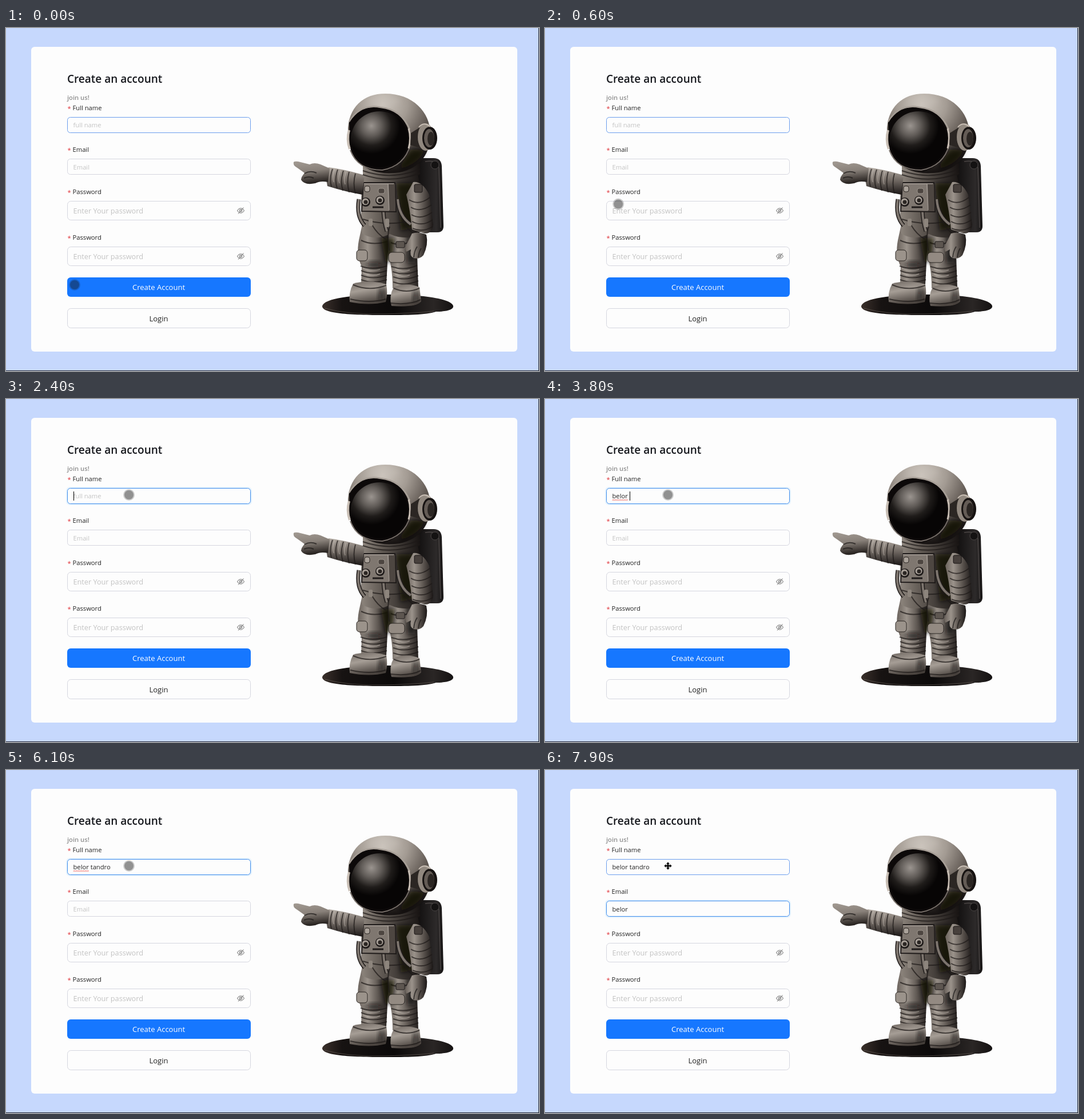
Animation of 932 by 601 pixels, one loop 8000 ms. Source, as an HTML page:

```html
<!DOCTYPE html>
<html lang="en">
<head>
<meta charset="utf-8">
<title>Create an account</title>
<style>
  html, body { margin: 0; width: 100%; height: 100%; overflow: hidden; background: #c6d8fd; }
  svg { display: block; width: 932px; height: 601px; }
  text { font: 11.2px "Open Sans", "Noto Sans", sans-serif; fill: #222; }
  .title { font-size: 19px; font-weight: 600; fill: #15171c; }
  .sub { font-weight: 600; fill: #8e8e8e; }
  .star { fill: #e0353c; }
  .hint { fill: #c3c3c3; }
  .big { font-size: 12.7px; }
  .mid { font-size: 13px; text-anchor: middle; }
  .box { fill: #fdfdfd; stroke: #d5d6df; }
  .hover { stroke: #6a9ded; }
  .focus { stroke: #3f8cec; }
  .glow { fill: none; stroke: #0591ff; stroke-opacity: .1; stroke-width: 2; }
  .fold { fill: none; stroke: #1d1918; stroke-opacity: .7; stroke-width: 2; }
  .shine { fill: none; stroke: #c9c1b9; stroke-opacity: .5; stroke-width: 1.5; }
  .shade { fill: #0d0a09; fill-opacity: .75; filter: url(#soft); }
  .light { fill: #c4bcb4; fill-opacity: .55; filter: url(#soft); }
</style>
</head>
<body>
<svg viewBox="0 0 932 601">
  <defs>
    <filter id="soft" x="-50%" y="-50%" width="200%" height="200%"><feGaussianBlur stdDeviation="4"/></filter>
    <pattern id="wave" width="4" height="3" patternUnits="userSpaceOnUse" x="117.5" y="175.5">
      <path d="M0 2.5L2 .5L4 2.5" fill="none" stroke="#e8322c"/>
    </pattern>
    <radialGradient id="shell" cx=".42" cy=".12" r=".88">
      <stop offset="0" stop-color="#cfc8c0"/><stop offset=".35" stop-color="#a39b93"/>
      <stop offset=".62" stop-color="#69615b"/><stop offset=".85" stop-color="#2e2926"/>
      <stop offset="1" stop-color="#171312"/>
    </radialGradient>
    <radialGradient id="glass" cx=".36" cy=".26" r=".5">
      <stop offset="0" stop-color="#9a948f"/><stop offset=".35" stop-color="#625d59"/>
      <stop offset=".7" stop-color="#1f1c1a"/><stop offset="1" stop-color="#070505"/>
    </radialGradient>
    <linearGradient id="suit">
      <stop offset="0" stop-color="#8d857d"/><stop offset=".35" stop-color="#5f5852"/>
      <stop offset=".75" stop-color="#322d2a"/><stop offset="1" stop-color="#171312"/>
    </linearGradient>
    <linearGradient id="limb">
      <stop offset="0" stop-color="#6b635d"/><stop offset=".3" stop-color="#9b938b"/>
      <stop offset=".65" stop-color="#59524d"/><stop offset="1" stop-color="#1b1716"/>
    </linearGradient>
    <linearGradient id="arm" x2="0" y2="1">
      <stop offset="0" stop-color="#b4aca4"/><stop offset=".45" stop-color="#756d67"/>
      <stop offset="1" stop-color="#1b1716"/>
    </linearGradient>
    <linearGradient id="hand" x2=".2" y2="1">
      <stop offset="0" stop-color="#a39b93"/><stop offset=".5" stop-color="#89817a"/>
      <stop offset="1" stop-color="#2b2623"/>
    </linearGradient>
    <linearGradient id="boot" x2=".3" y2="1">
      <stop offset="0" stop-color="#6f6761"/><stop offset=".45" stop-color="#a69e96"/>
      <stop offset="1" stop-color="#4d4641"/>
    </linearGradient>
    <linearGradient id="pack">
      <stop offset="0" stop-color="#0d0b0b"/><stop offset=".75" stop-color="#2d2a2a"/>
      <stop offset="1" stop-color="#151313"/>
    </linearGradient>
    <linearGradient id="disc">
      <stop offset="0" stop-color="#3a302b"/><stop offset=".15" stop-color="#171312"/>
      <stop offset=".55" stop-color="#0c0a0a"/><stop offset=".85" stop-color="#2a2625"/>
      <stop offset="1" stop-color="#151212"/>
    </linearGradient>
    <g id="eye" fill="none" stroke="#858585" stroke-width="1.1">
      <path d="M-6 0Q0-8.500 6 0Q0 8.500-6 0Z"/><circle r="2.100"/><path d="M-4.500 5.500L5-5.500"/>
    </g>
    <g id="knob">
      <circle r="8" fill="#1f1b1a"/><circle cx="-.5" cy="-.7" r="6" fill="#a69e96"/>
      <circle r="3.500" fill="#2b2623"/>
    </g>
  </defs>

  <rect width="932" height="601" fill="#c6d8fd"/>
  <path d="M931.500 0V601M0 600.500H932" stroke="#252932"/>
  <rect x="44" y="33" width="850" height="534" rx="6" fill="#fdfdfd"/>

  <text class="title" x="107" y="96">Create an account</text>
  <text class="sub" x="107" y="126">join us!</text>
  <g id="labels"></g>

  <g id="name">
    <rect class="glow" x="106" y="155" width="323" height="30" rx="6"/>
    <rect class="box hover" x="107.500" y="156.500" width="320" height="27" rx="5"/>
    <text class="hint" x="117.500" y="173.500">full name</text>
    <text class="value" x="117.500" y="173.500"></text>
    <rect class="caret" y="162" width="1" height="16"/>
    <rect id="squiggle" x="117.500" y="175.500" height="3" fill="url(#wave)"/>
  </g>
  <g id="email">
    <rect class="glow" x="106" y="228" width="323" height="30" rx="6"/>
    <rect class="box" x="107.500" y="229.500" width="320" height="27" rx="5"/>
    <text class="hint" x="117.500" y="247.500">Email</text>
    <text class="value" x="117.500" y="247.500"></text>
    <rect class="caret" y="235" width="1" height="16"/>
  </g>

  <rect class="box" x="107.500" y="303.500" width="320" height="33" rx="6"/>
  <text class="hint big" x="117.500" y="325">Enter Your password</text>
  <use href="#eye" x="410.500" y="320"/>
  <rect class="box" x="107.500" y="383.500" width="320" height="33" rx="6"/>
  <text class="hint big" x="117.500" y="405">Enter Your password</text>
  <use href="#eye" x="410.500" y="400"/>
  <rect x="107" y="437" width="321" height="34" rx="6" fill="#1677ff"/>
  <text class="mid" x="267" y="459" style="fill:#fff">Create Account</text>
  <rect class="box" x="107.500" y="491.500" width="320" height="34" rx="6"/>
  <text class="mid" x="267" y="514">Login</text>

  <g id="astronaut">
    <path d="M553 487C556 474 605 467 668 467C732 467 779 475 782 487C783 493 772 497 752 497C734 503 700 503 664 503C600 503 552 500 553 487Z" fill="url(#disc)"/>
    <path d="M557 491Q600 503 664 501T748 496" fill="none" stroke="#6b625b" stroke-opacity=".6"/>
    <!-- backpack -->
    <path d="M715 228H748Q761 228 762 242L765 347Q765 358 754 358H718Z" fill="url(#pack)"/>
    <path d="M733 234Q755 230 757 246L760 350" fill="none" stroke="#4a4544" stroke-width="1.500"/>
    <circle cx="750" cy="240" r="7" fill="#141212" stroke="#4a4544"/>
    <!-- legs -->
    <path d="M626 330L617 372Q612 398 622 418L621 450H665L668 392L672 360Z" fill="url(#limb)"/>
    <path d="M668 350L668 398Q676 420 676 456H721L719 400L724 345Z" fill="url(#limb)"/>
    <path class="fold" d="M620 417Q640 425 666 417M621 425Q642 434 666 425M621 433Q642 442 666 433M621 441Q642 449 666 441M674 418Q697 426 719 416M676 427Q698 435 720 425M677 436Q698 444 721 434M677 445Q698 453 721 443"/>
    <path class="shine" d="M624 421Q640 428 654 423M624 429Q640 437 654 431M680 422Q695 429 706 424M680 431Q695 438 706 433"/>
    <path class="fold" d="M621 372Q640 382 667 374M673 376Q690 384 716 371"/>
    <path class="shade" d="M655 368H680L676 408L664 412Z"/>
    <path class="shade" d="M703 352H716L715 412H701Z"/>
    <ellipse class="shade" cx="643" cy="415" rx="15" ry="5"/>
    <rect x="613" y="389" width="19" height="19" rx="5" fill="#9b938b" stroke="#2b2623"/>
    <rect x="669" y="393" width="28" height="18" rx="6" fill="#938a82" stroke="#2b2623"/>
    <rect x="682" y="374" width="15" height="11" rx="2" fill="#5d5650" stroke="#1f1b1a"/>
    <path d="M607 448Q635 440 665 449Q668 465 664 480Q635 487 601 480Q599 463 607 448Z" fill="url(#boot)"/>
    <path d="M678 454Q700 445 723 454L726 479Q718 490 674 487Q669 470 678 454Z" fill="url(#boot)"/>
    <path class="shade" d="M654 455H661V477H652Z"/>
    <path class="shade" d="M714 460H720V479H712Z"/>
    <path class="fold" d="M602 475Q636 483 664 475M672 482Q706 486 725 476M607 450Q635 462 665 451M678 456Q700 466 723 456"/>
    <!-- body -->
    <path d="M624 258Q670 273 720 256Q730 302 724 345L716 366Q690 370 671 361Q644 374 623 360Q618 306 624 258Z" fill="url(#suit)"/>
    <path class="shade" d="M682 272H712V350L690 356Z"/>
    <path class="fold" d="M624 335Q670 350 724 334M671 348Q666 360 670 390M690 326Q696 348 712 360M640 345Q650 362 664 370"/>
    <path d="M617 300Q612 330 627 346M660 322Q661 340 666 356M685 300Q687 330 708 344" fill="none" stroke="#1f1b1a" stroke-width="7"/>
    <path d="M617 300Q612 330 627 346M660 322Q661 340 666 356M685 300Q687 330 708 344" fill="none" stroke="#7d756e" stroke-width="4"/>
    <rect x="634" y="334" width="7" height="13" rx="2" fill="#8d857d"/>
    <rect x="663" y="334" width="7" height="15" rx="2" fill="#8d857d"/>
    <path d="M625 271H680L682 322L622 321Z" fill="#7f7770" stroke="#1f1b1a" stroke-width="2"/>
    <path d="M669 273H680L681 321H670Z" fill="#4d4641"/>
    <path class="shine" d="M626 273H678M668 274L670 319"/>
    <rect x="627" y="277" width="9" height="10" rx="3" fill="#aaa29a" stroke="#2b2623"/>
    <rect x="651" y="281" width="11" height="9" rx="3" fill="#4d4641" stroke="#9b938b"/>
    <use href="#knob" x="629" y="305"/><use href="#knob" x="654" y="302"/>
    <path d="M641 314H660" stroke="#1f1b1a" stroke-width="3"/>
    <!-- pointing arm -->
    <path d="M564 244Q594 248 627 258L623 292Q594 287 562 277Q558 260 564 244Z" fill="url(#arm)"/>
    <path class="fold" d="M571 247Q565 263 569 278M580 248Q574 265 579 281M590 250Q584 268 589 285M600 252Q595 270 600 288M611 255Q606 272 611 290"/>
    <path class="shine" d="M575 247Q570 260 573 270M585 249Q580 262 583 272M595 251Q590 264 593 274"/>
    <path d="M503 235Q504 233 511 234L531 239Q539 235 550 239L566 246L563 270Q550 267 541 272Q522 276 516 266Q516 261 522 254L505 242Q502 239 503 235Z" fill="url(#hand)"/>
    <path class="fold" d="M522 255Q532 249 543 254M521 263Q530 259 538 263"/>
    <!-- hanging arm -->
    <path d="M712 270Q728 268 740 292L747 345Q745 361 732 360L710 353Q707 320 700 292Z" fill="url(#limb)"/>
    <path class="fold" d="M705 301Q722 312 741 297M708 314Q724 324 744 310M709 327Q726 337 745 323M710 339Q728 349 746 336M711 351Q728 359 746 348"/>
    <rect x="714" y="274" width="14" height="14" rx="2" fill="#47403c" stroke="#171312"/>
    <path d="M710 360Q722 356 735 362Q739 379 730 398Q723 406 713 403Q705 400 708 388L700 392Q696 384 703 374Z" fill="url(#limb)"/>
    <path class="fold" d="M713 402Q714 390 719 383M721 402Q722 392 726 386"/>
    <!-- helmet -->
    <path d="M624 240Q672 264 724 236L724 257Q674 275 624 261Z" fill="url(#suit)"/>
    <path class="fold" d="M624 250Q674 268 724 247M624 257Q674 274 724 254"/>
    <path d="M598 187C596 140 624 115 663 115C712 115 743 148 742 188C742 223 719 251 680 254C631 258 601 234 598 187Z" fill="url(#shell)"/>
    <path class="shade" d="M708 212L733 214Q722 238 690 247L690 240Z"/>
    <ellipse class="light" cx="660" cy="128" rx="28" ry="6"/>
    <path d="M600 166Q616 136 650 139Q698 142 708 194Q705 238 662 251Q614 252 601 208Z" fill="#0c0909"/>
    <ellipse cx="653" cy="195" rx="50" ry="49" fill="url(#glass)"/>
    <path d="M602 214Q615 249 658 249Q697 242 707 204" fill="none" stroke="#756d67" stroke-width="2"/>
    <path d="M600 164Q620 132 655 139Q692 143 706 178" fill="none" stroke="#a69e96" stroke-width="2.500"/>
    <path d="M600 179Q595 195 601 212" fill="none" stroke="#c8beb4" stroke-width="4"/>
    <path d="M704 176Q709 193 704 211" fill="none" stroke="#c8beb4" stroke-width="3"/>
    <path d="M708 184L724 174V210L707 205Z" fill="#2b2623"/>
    <ellipse cx="734" cy="191" rx="14" ry="24" fill="#91887f"/>
    <ellipse cx="741" cy="193" rx="13" ry="20" fill="#171312"/>
    <ellipse cx="740" cy="193" rx="9" ry="16" fill="#645c56"/>
    <ellipse cx="743" cy="194" rx="6" ry="12" fill="#2b2623"/>
    <path d="M722 174Q730 163 742 173" fill="none" stroke="#c8beb4" stroke-width="2"/>
  </g>

  <g id="pointer">
    <g id="dot">
      <circle r="10" fill="#141414" fill-opacity=".2"/>
      <circle r="8" fill="#141414" fill-opacity=".33"/>
    </g>
    <path id="move" d="M0-6.500L2.500-3.500H1V-1H3.500V-2.500L6.500 0L3.500 2.500V1H1V3.500H2.500L0 6.500L-2.500 3.500H-1V1H-3.500V2.500L-6.500 0L-3.500-2.500V-1H-1V-3.500H-2.500Z" fill="#000" stroke="#000" stroke-width=".4"/>
  </g>
</svg>
<script>
  const LOOP = 8000;
  const $ = (s, root = document) => root.querySelector(s);
  const show = (el, on) => { el.style.display = on ? '' : 'none'; };

  $('#labels').innerHTML = [['Full name', 144], ['Email', 217], ['Password', 291], ['Password', 371]]
    .map(([s, y]) => `<text class="star" x="107.500" y="${y + 1}">*</text><text x="116.500" y="${y}">${s}</text>`)
    .join('');

  // keys: the time at which each letter is typed
  const fields = [
    { root: $('#name'), text: 'belor tandro', from: 1100, to: 6200,
      keys: [2500, 2800, 3000, 3200, 3400, 3700, 4100, 4400, 4700, 4900, 5100, 5300] },
    { root: $('#email'), text: 'belor', from: 6200, to: LOOP,
      keys: [6600, 6800, 7000, 7100, 7400] }
  ];

  const path = [[0, 120, 450], [150, 120, 446], [600, 128, 309], [850, 180, 208], [1050, 215, 168]];

  function pointerAt(t) {
    const i = path.findIndex(p => p[0] > t);
    if (i < 0) return path[path.length - 1].slice(1);
    const [a, b] = [path[i - 1], path[i]];
    const k = (t - a[0]) / (b[0] - a[0]);
    return [1, 2].map(j => a[j] + (b[j] - a[j]) * k);
  }

  function drawField({ root, text, from, to, keys }, t) {
    const focused = t >= from && t < to;
    const typed = keys.filter(k => k <= t);
    const value = $('.value', root);
    value.textContent = text.slice(0, typed.length).replace(' ', '\u00a0');
    show($('.hint', root), !typed.length);
    show($('.glow', root), focused);
    $('.box', root).classList.toggle('focus', focused);

    const caret = $('.caret', root);
    const idle = t - Math.max(from, ...typed);
    show(caret, focused && idle % 1000 < 500);
    caret.setAttribute('x', Math.round(117.5 + value.getComputedTextLength()));
  }

  function draw(t) {
    fields.forEach(f => drawField(f, t));

    const wave = $('#squiggle');
    show(wave, t >= 3500 && t < 6200);
    if (t >= 3500) wave.setAttribute('width', $('#name .value').getSubStringLength(0, 5));

    $('#pointer').setAttribute('transform', `translate(${pointerAt(t)})`);
    show($('#dot'), t < 7800);
    show($('#move'), t >= 7800);
  }

  const start = performance.now();
  function tick() {
    draw((performance.now() - start) % LOOP);
    requestAnimationFrame(tick);
  }
  tick();
</script>
</body>
</html>
```
